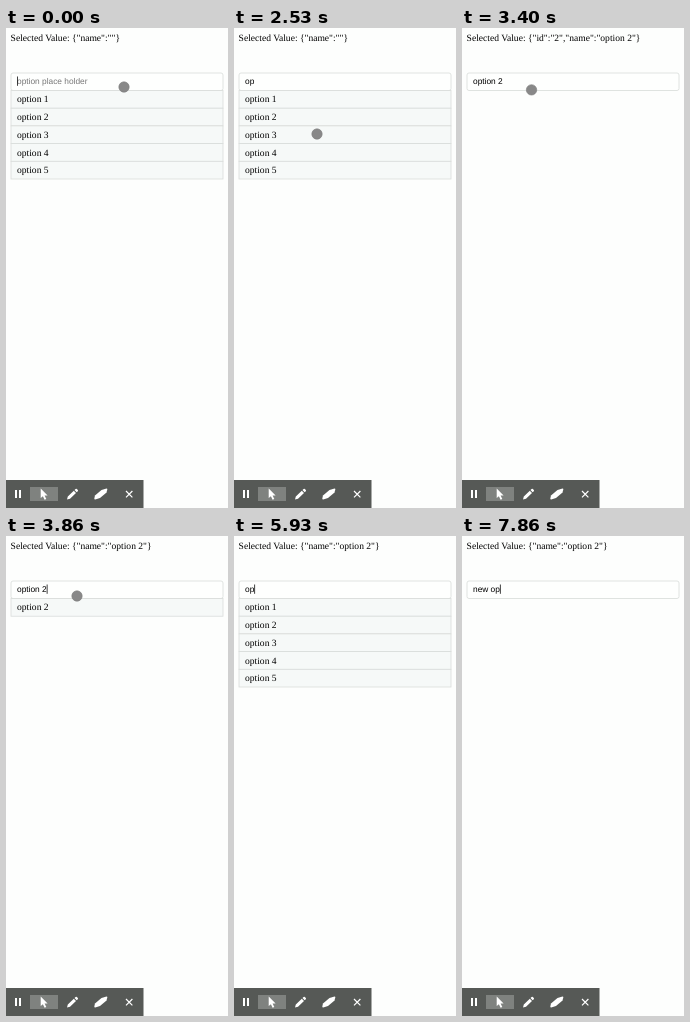
Write an HTML page that moves like this. It is 222 px wide and 480 px high and loops after 8000 ms.

```html
<!DOCTYPE html>
<html>
<head>
<meta charset="utf-8">
<style>
  html, body { margin: 0; width: 100%; height: 100%; overflow: hidden; background: #fdfefd; }
  svg { display: block; width: 222px; height: 480px; }
  text { white-space: pre; text-rendering: geometricPrecision; }
  .serif { font: 9.55px "Liberation Serif", Times, serif; }
  .sans { font: 8.35px "Liberation Sans", Arial, sans-serif; }
  .box { stroke: #d9dcda; stroke-width: .8; }
</style>
</head>
<body>
<svg viewBox="0 0 222 480">
  <text id="value" class="serif" x="4.6" y="13"></text>
  <rect class="box" x="5" y="45" width="212" height="17.5" rx="2" fill="#fefffe"/>
  <text id="field" class="sans" x="11" y="56.4"></text>
  <g id="list"></g>
  <rect id="caret" y="48.5" width=".8" height="9.3" fill="#111"/>
  <g id="pointer">
    <circle id="ring" fill="#777" fill-opacity=".4"/>
    <circle r="5.2" fill="#888" stroke="#7c7c7c" stroke-width=".6"/>
  </g>
  <g fill="#fff">
    <rect y="452" width="137.5" height="28" fill="#565956"/>
    <rect x="24" y="459" width="28" height="14" fill="#7f827f"/>
    <path d="M9 462h2v8h-2zM13 462h2v8h-2z"/>
    <path d="M34.7 460.5v9.6l2.2-1.9 1.7 3.5 1.7-.8-1.7-3.4h3z"/>
    <path d="M61 471.5l.8-3 6-5.7 2.2 2.2-6 5.7zM68.5 462.1l1.1-1.1q.7-.5 1.3 0l.9.9q.5.6 0 1.3l-1.1 1.1z"/>
    <path d="M89 467.5l6.5-5.4 5-1.6q1 0 .8 1l-.8 3-6.5 5.4-4.8 1.7q-1.1 0-.9-1.1z"/>
    <path d="M120 463l6.4 6.4M126.4 463l-6.4 6.4" stroke="#fff" stroke-width="1.2"/>
  </g>
</svg>
<script>
const LOOP = 8000;
const $ = id => document.getElementById(id);
const options = [1, 2, 3, 4, 5].map(n => "option " + n);

// time, field text, caret shown
const typing = [
  [0, "", 1], [400, "", 0], [860, "", 1],
  [1000, "o", 1], [1460, "o", 0], [1730, "op", 1], [2260, "op", 0], [2790, "op", 1],
  [3000, "option 2", 0], [3660, "option 2", 1], [4200, "option 2", 0],
  [4330, "option ", 1], [4860, "option ", 0], [5330, "option", 1],
  [5530, "optio", 1], [5660, "opti", 1], [5800, "opt", 1], [5930, "op", 1], [6130, "o", 1],
  [6330, "", 1], [6860, "n", 1], [7000, "ne", 1], [7200, "new", 1],
  [7400, "new ", 1], [7660, "new o", 1], [7860, "new op", 1]
];

// time, x, y of the pointer
const path = [
  [0, 118, 59], [2260, 118, 59], [2330, 122, 74], [2530, 83, 106],
  [2800, 46, 92], [3060, 46, 92], [3460, 71, 60]
];

// press and release times
const clicks = [[2800, 3060], [3560, 3800]];

const clamp = v => Math.max(0, Math.min(1, v));
const ease = v => v * v * (3 - 2 * v);

function pointerAt(t) {
  const i = path.findLastIndex(p => p[0] <= t);
  const a = path[i], b = path[i + 1] || a;
  const k = ease(clamp((t - a[0]) / (b[0] - a[0] || 1)));
  return [a[1] + (b[1] - a[1]) * k, a[2] + (b[2] - a[2]) * k];
}

function ringAt(t) {
  const grow = clicks.map(([down, up]) => Math.min(clamp((t - down) / 120), clamp((up + 60 - t) / 60)));
  return 8 * Math.max(...grow);
}

function valueAt(t) {
  if (t < 3000) return '{"name":""}';
  return t < 3460 ? '{"id":"2","name":"option 2"}' : '{"name":"option 2"}';
}

function row(label, i) {
  const y = 62.5 + i * 17.7;
  return `<rect class="box" x="5" y="${y}" width="212" height="17.7" fill="#f6f9f8"/>
    <text class="serif" x="11" y="${y + 11.9}">${label}</text>`;
}

let shown;
function draw(t) {
  const [, text, blink] = typing.findLast(s => s[0] <= t);
  const field = $("field");
  $("value").textContent = "Selected Value: " + valueAt(t);
  field.textContent = text || "option place holder";
  field.setAttribute("fill", text ? "#000" : "#777");

  const open = t < 3000 || t >= 3660;
  const rows = open ? options.filter(o => o.includes(text)).map(row).join("") : "";
  if (rows !== shown) $("list").innerHTML = shown = rows;

  $("caret").setAttribute("x", 11 + (text ? field.getComputedTextLength() : 0));
  $("caret").style.opacity = blink;

  $("pointer").style.opacity = t < 130 || (t >= 2330 && t < 5800) ? 1 : 0;
  $("pointer").setAttribute("transform", `translate(${pointerAt(t)})`);
  $("ring").setAttribute("r", ringAt(t));
}

const start = performance.now();
function tick() {
  draw((performance.now() - start) % LOOP);
  requestAnimationFrame(tick);
}
tick();
</script>
</body>
</html>
```
